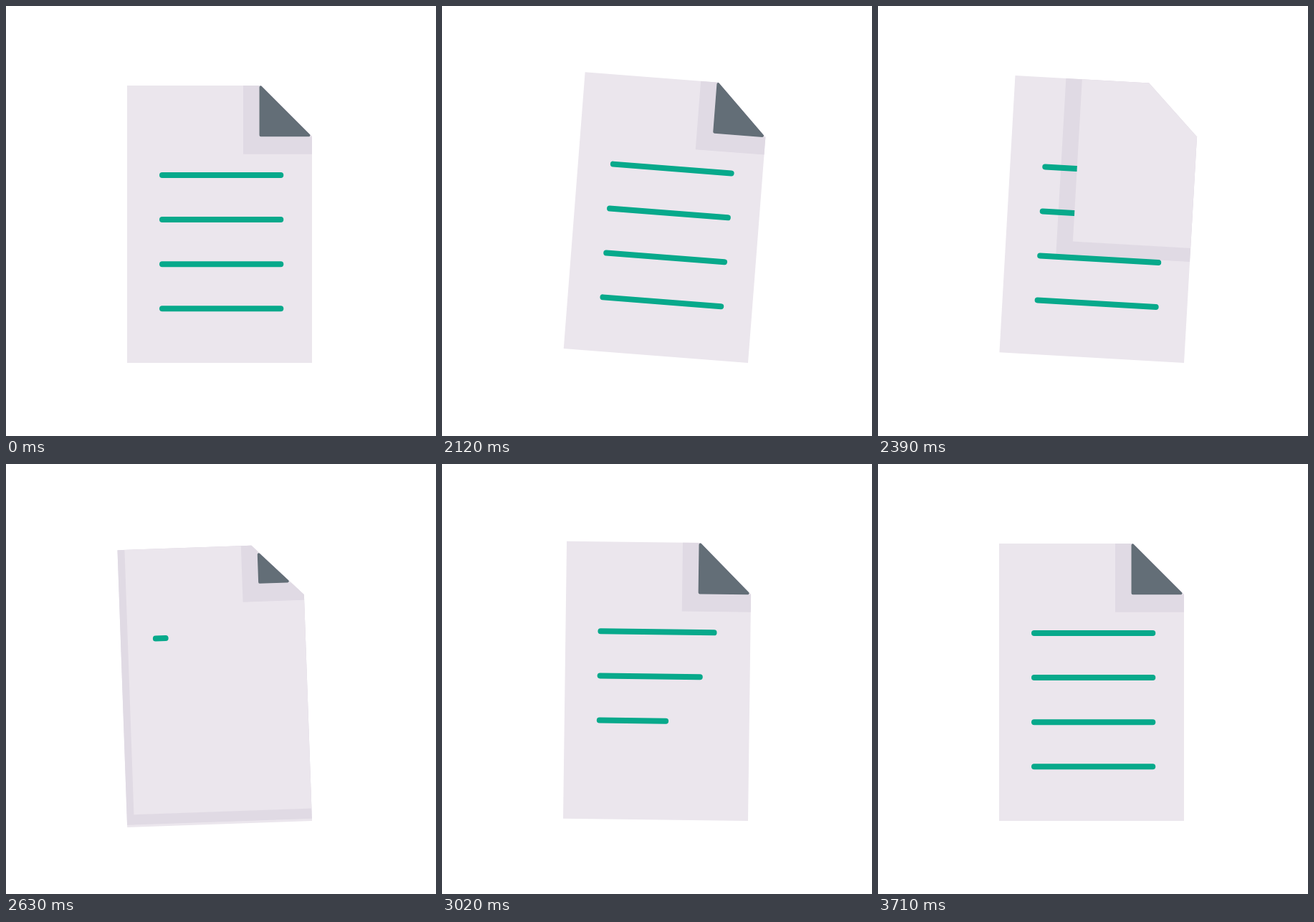
An HTML page with a canvas that plays this animation: 600x600 px, repeating every 4430 ms.

```html
<!DOCTYPE html>
<html>
<head>
<meta charset="utf-8">
<style>
html, body { margin: 0; width: 100%; height: 100%; overflow: hidden; background: #fff; }
canvas { display: block; }
</style>
</head>
<body>
<canvas id="stage" width="600" height="600"></canvas>
<script>
const ctx = document.getElementById('stage').getContext('2d');
const LOOP = 4430, STEP = 30;
const PAPER = '#ebe6ed', SHADE = '#e0dae4', FOLD = '#636e77', INK = '#07a98b';
const LEFT = 169, RIGHT = 427, TOP = 111, BOTTOM = 498;
const CUT = 245;                       // cut edge: y = x - CUT
const TURN = { start: 2245, time: 505, reach: 185 };
const WRITE = { start: 2615, time: 868, gap: 137 };
const SWAY = [[2000, 0], [2275, 7], [2550, -3], [2825, 2], [3160, 0]];

const part = (t, start, time) => Math.min(1, Math.max(0, (t - start) / time));
const easeOut = (p, power) => 1 - (1 - p) ** power;
const easeInOut = p => (1 - Math.cos(Math.PI * p)) / 2;

function swayAngle(t) {
  for (let i = 1; i < SWAY.length; i++) {
    const [t0, a0] = SWAY[i - 1], [t1, a1] = SWAY[i];
    if (t >= t1) continue;
    const p = part(t, t0, t1 - t0);
    // the first swing starts at full speed
    return a0 + (a1 - a0) * (i === 1 ? Math.sin(p * Math.PI / 2) : easeInOut(p));
  }
  return 0;
}

function cornerRect(x, y, color) {
  ctx.fillStyle = color;
  ctx.fillRect(x, TOP - 5, RIGHT + 5 - x, Math.max(0, y - TOP + 5));
}

function textLine(i, p) {
  if (p <= 0) return;
  const y = 236 + i * 62.1;
  ctx.strokeStyle = INK;
  ctx.lineWidth = 8;
  ctx.beginPath();
  ctx.moveTo(218, y);
  ctx.lineTo(218 + 165.3 * p, y);
  ctx.stroke();
}

function foldTriangle(x, y, alpha) {
  const r = 2, inset = r * Math.SQRT2;
  const left = x + r, base = y - r;
  const peak = left - CUT + inset;
  if (alpha <= 0 || peak >= base) return;
  ctx.globalAlpha = alpha;
  ctx.fillStyle = ctx.strokeStyle = FOLD;
  ctx.lineWidth = 2 * r;
  ctx.beginPath();
  ctx.moveTo(left, base);
  ctx.lineTo(left, peak);
  ctx.lineTo(base + CUT - inset, base);
  ctx.closePath();
  if (alpha === 1) ctx.stroke();
  ctx.fill();
  ctx.globalAlpha = 1;
}

// shift: how far the turned corner lies to the left of its resting place
function sheet(shift, written, foldAlpha) {
  const x = 353.5 - shift, y = 182.3 + shift * 1.708;
  cornerRect(331 - shift, 206.7 + shift * 1.65, SHADE);
  for (let i = 0; i < 4; i++) textLine(i, written(i));
  cornerRect(x, y, PAPER);
  foldTriangle(x, y, foldAlpha);
}

function pagePath() {
  ctx.beginPath();
  ctx.moveTo(LEFT, TOP);
  ctx.lineTo(TOP + CUT, TOP);
  ctx.lineTo(RIGHT, RIGHT - CUT);
  ctx.lineTo(RIGHT, BOTTOM);
  ctx.lineTo(LEFT, BOTTOM);
  ctx.closePath();
}

function draw(t) {
  ctx.fillStyle = '#fff';
  ctx.fillRect(0, 0, 600, 600);
  ctx.save();
  ctx.translate(RIGHT, 497.7);
  ctx.rotate(swayAngle(t) * Math.PI / 180);
  ctx.translate(-RIGHT, -497.7);
  pagePath();
  ctx.fillStyle = PAPER;
  ctx.fill();
  ctx.clip();

  const turned = easeOut(part(t, TURN.start, TURN.time), 2);
  if (turned < 1) sheet(turned * TURN.reach, () => 1, 1 - part(t, TURN.start, 125));
  if (turned > 0) {
    const written = i => easeOut(part(t, WRITE.start + i * WRITE.gap, WRITE.time), 5);
    sheet((turned - 1) * TURN.reach, written, 1);
  }
  ctx.restore();
}

ctx.lineCap = ctx.lineJoin = 'round';
const begin = performance.now();
function tick() {
  const t = (performance.now() - begin) % LOOP;
  draw(Math.max(0, Math.floor((t - 20) / STEP) * STEP + 20));
  requestAnimationFrame(tick);
}
tick();
</script>
</body>
</html>
```
